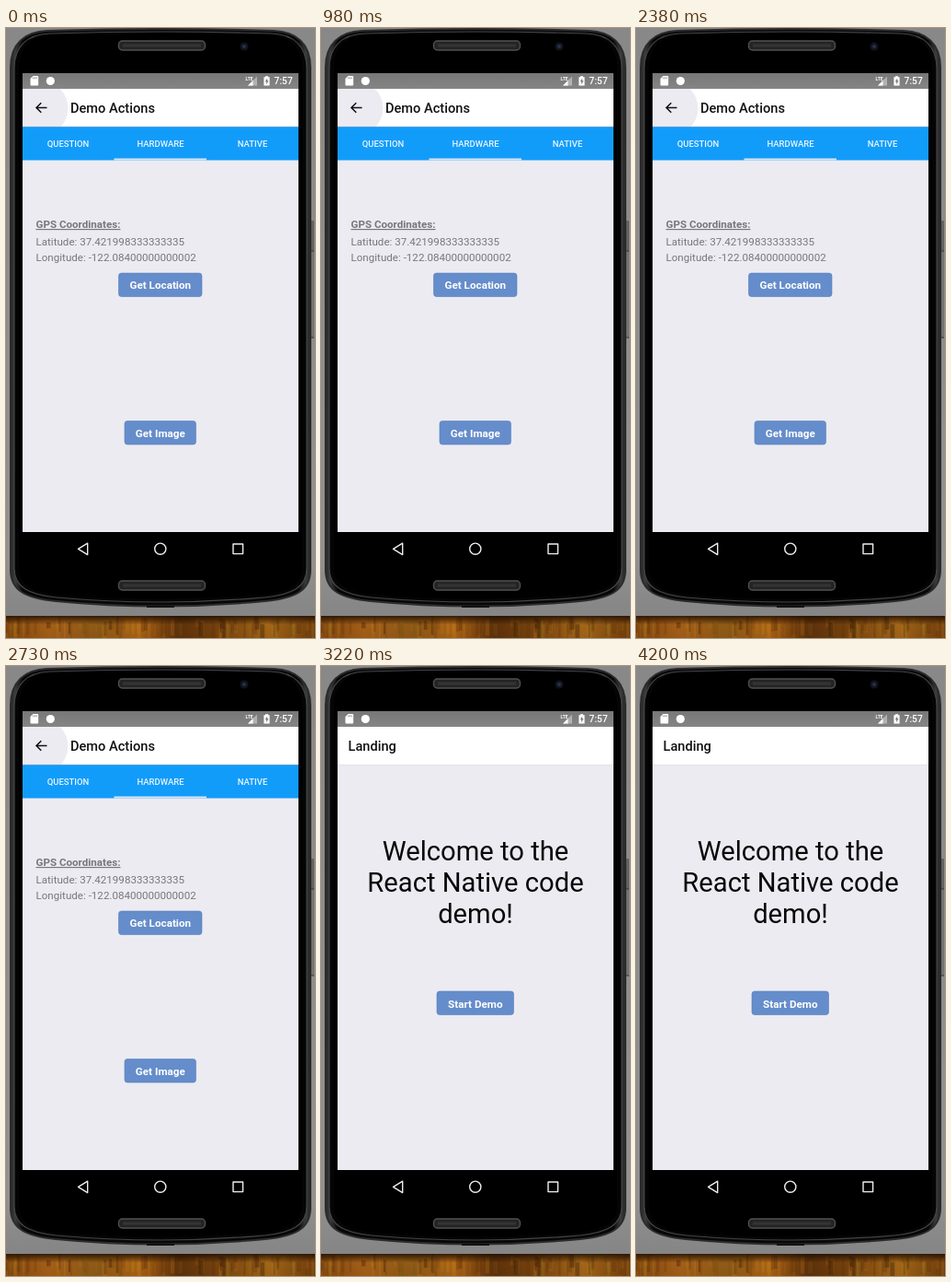
These frames come from a looping animation (336 by 662 pixels, 4.27 s). An HTML page:

```html
<!DOCTYPE html>
<html lang="en">
<head>
<meta charset="utf-8">
<title>Phone demo</title>
<style>
  html, body { margin: 0; width: 100%; height: 100%; overflow: hidden; background: #8a8a8a; }
  svg { display: block; width: 336px; height: 662px; font-family: Roboto, sans-serif; }
  .title { font-size: 14.6px; font-weight: 500; fill: #111; }
  .tab { font-size: 9.5px; font-weight: 500; fill: #e9f5ff; text-anchor: middle; }
  .label { font-size: 11.6px; fill: #77777b; }
  .button rect { fill: #658dcb; stroke: #577dba; stroke-width: .6; }
  .button text { font-size: 11.7px; font-weight: 700; fill: #fff; text-anchor: middle; }
  .hero { font-size: 29.2px; fill: #080808; text-anchor: middle; }
</style>
</head>
<body>
<svg viewBox="0 0 336 662">
  <defs>
    <linearGradient id="desk" x2="0" y2="1">
      <stop offset="0" stop-color="#888"/>
      <stop offset=".9" stop-color="#919191"/>
      <stop offset="1" stop-color="#858585"/>
    </linearGradient>
    <linearGradient id="wood">
      <stop offset="0" stop-color="#8e4d10"/>
      <stop offset=".14" stop-color="#b3681a"/>
      <stop offset=".3" stop-color="#9a6218"/>
      <stop offset=".43" stop-color="#ba6c16"/>
      <stop offset=".56" stop-color="#64350b"/>
      <stop offset=".7" stop-color="#854b10"/>
      <stop offset=".85" stop-color="#b1701a"/>
      <stop offset="1" stop-color="#7c420d"/>
    </linearGradient>
    <linearGradient id="shade" x2="0" y2="1">
      <stop offset="0" stop-color="#1d0d02" stop-opacity=".85"/>
      <stop offset=".4" stop-color="#1d0d02" stop-opacity=".1"/>
      <stop offset="1" stop-color="#1d0d02" stop-opacity=".15"/>
    </linearGradient>
    <linearGradient id="case">
      <stop offset="0" stop-color="#252525"/>
      <stop offset=".015" stop-color="#3d3d3d"/>
      <stop offset=".04" stop-color="#080808"/>
      <stop offset=".96" stop-color="#080808"/>
      <stop offset=".985" stop-color="#3d3d3d"/>
      <stop offset="1" stop-color="#222"/>
    </linearGradient>
    <linearGradient id="status" x2="0" y2="1">
      <stop offset="0" stop-color="#777"/>
      <stop offset="1" stop-color="#858585"/>
    </linearGradient>
    <clipPath id="header"><rect x="18" y="66" width="300" height="41"/></clipPath>
  </defs>

  <rect width="336" height="638" fill="url(#desk)"/>
  <rect y="638" width="336" height="24" fill="url(#wood)"/>
  <g id="grain"></g>
  <rect y="638" width="336" height="24" fill="url(#shade)"/>

  <!-- phone -->
  <rect x="331" y="209" width="4" height="33" rx="1" fill="#626262"/>
  <rect x="331" y="242" width="4" height="94" rx="1" fill="#737373"/>
  <path d="M331 242h4M331 336h4" stroke="#333"/>
  <path d="M45 3Q168 -1 291 3C316 4 331 17 331 43V588C331 611 314 619 282 622Q168 633 54 622C22 619 5 611 5 588V43C5 17 20 4 45 3Z" fill="url(#case)" stroke="#2c2c2c" stroke-width="2"/>
  <path d="M47 6Q168 2 289 6C313 7 327 20 327 44V586C327 607 311 615 281 618Q168 628 55 618C25 615 9 607 9 586V44C9 20 23 7 47 6Z" fill="#050505" stroke="#444" stroke-width="1.2"/>
  <path d="M48 8Q168 4 288 8C310 9 322 22 322 45V585C322 604 308 612 280 615Q168 624 56 615C28 612 14 604 14 585V45C14 22 26 9 48 8Z" fill="#000"/>
  <path d="M153 628h30" stroke="#111" stroke-width="2"/>
  <g fill="#242424" stroke="#505050" stroke-width="1.4">
    <rect x="122.5" y="14" width="94" height="10" rx="4"/>
    <rect x="122.5" y="600" width="94" height="10" rx="4"/>
  </g>
  <path d="M127 19h85M127 605h85" stroke="#343434" stroke-width="3"/>
  <circle cx="259" cy="20" r="4.5" fill="#11141d"/>
  <circle cx="259" cy="20" r="2" fill="#26314c"/>

  <rect x="18" y="49" width="300" height="498" fill="#fff"/>

  <g id="hardware">
    <rect x="18" y="107" width="300" height="440" fill="#ecebf2"/>
    <circle cx="38" cy="87" r="29.5" fill="#ecebf2" clip-path="url(#header)"/>
    <path d="M44.5 86.5H33M38.3 81.2L33 86.5L38.3 91.8" fill="none" stroke="#111" stroke-width="1.5"/>
    <text class="title" x="70" y="92">Demo Actions</text>
    <rect x="18" y="107" width="300" height="36.5" fill="#129cfa"/>
    <path d="M18 107.3h300" stroke="#8aa9c4" stroke-width=".6"/>
    <rect x="117.5" y="141.5" width="100.5" height="2" fill="#d9e5f2"/>
    <text class="tab" x="67.5" y="129">QUESTION</text>
    <text class="tab" x="168" y="129">HARDWARE</text>
    <text class="tab" x="268" y="129">NATIVE</text>
    <text class="label" x="32.5" y="217" font-weight="700" text-decoration="underline">GPS Coordinates:</text>
    <text class="label" x="32.5" y="236">Latitude: 37.421998333333335</text>
    <text class="label" x="32.5" y="253">Longitude: -122.08400000000002</text>
    <g class="button">
      <rect x="122.5" y="266" width="90.5" height="25.5" rx="3"/>
      <text x="167.8" y="283.3">Get Location</text>
      <rect x="129" y="426.5" width="77.5" height="25.5" rx="3"/>
      <text x="167.8" y="443.8">Get Image</text>
    </g>
  </g>

  <g id="landing">
    <rect x="18" y="107" width="300" height="440" fill="#ecebf2"/>
    <path d="M18 107.3h300" stroke="#dddce2" stroke-width=".6"/>
    <text class="title" x="29.5" y="92">Landing</text>
    <g class="hero">
      <text x="168" y="211">Welcome to the</text>
      <text x="168" y="245">React Native code</text>
      <text x="168" y="279">demo!</text>
    </g>
    <g class="button">
      <rect x="126" y="353" width="83.5" height="25.5" rx="3"/>
      <text x="167.8" y="370.5">Start Demo</text>
    </g>
  </g>

  <!-- status bar -->
  <rect x="18" y="49" width="300" height="17" fill="url(#status)"/>
  <g fill="#fff">
    <path d="M29.5 52H34.2Q35.2 52 35.2 53V61.5Q35.2 62.5 34.2 62.5H27.5Q26.5 62.5 26.5 61.5V55Z"/>
    <path d="M29.7 53.3v2M31.5 53.3v2M33.3 53.3v2" stroke="#7d7d7d" stroke-width=".8"/>
    <circle cx="48.3" cy="57.5" r="4.6"/>
    <text x="260.5" y="56.5" font-size="5" font-weight="700">LTE</text>
    <path d="M273 52.5V62.5H263Z" opacity=".4"/>
    <path d="M268.5 57V62.5H263Z"/>
    <path d="M282 52.2h3v1h1.6v9.3h-6.2v-9.3H282Z"/>
    <path d="M284.2 54.5L281.7 58.3H283.2V61.2L285.5 57.3H284.2Z" fill="#777"/>
    <text x="291.6" y="61.4" font-size="10.2" font-weight="500">7:57</text>
  </g>

  <!-- navigation -->
  <g fill="none" stroke="#eee" stroke-width="1.4" stroke-linejoin="round">
    <path d="M78.5 565.3L88.7 559.2V571.6Z"/>
    <circle cx="167.8" cy="565.2" r="6.1"/>
    <rect x="247" y="560" width="10.6" height="10.6"/>
  </g>
</svg>
<script>
  const LOOP = 4270;
  const steps = [[0, "hardware"], [2800, "blank"], [3150, "landing"]];
  const screens = ["hardware", "landing"].map(id => document.getElementById(id));

  function drawGrain() {
    let seed = 7;
    const random = () => (seed = seed * 16807 % 2147483647) / 2147483647;
    const tones = ["#2e1504", "#d58a24", "#693408", "#a88022"];
    let streaks = "";
    for (let i = 0; i < 110; i++) {
      const x = random() * 336, y = 638 + random() * 10;
      const w = 1 + random() * 4, h = 6 + random() * 16;
      streaks += `<rect x="${x}" y="${y}" width="${w}" height="${Math.min(h, 662 - y)}"
        fill="${tones[i % 4]}" opacity="${0.1 + random() * 0.25}"/>`;
    }
    document.getElementById("grain").innerHTML = streaks;
  }

  function render() {
    const t = performance.now() % LOOP;
    const current = steps.filter(([start]) => start <= t).pop()[1];
    for (const screen of screens) {
      screen.style.display = screen.id === current ? "" : "none";
    }
    requestAnimationFrame(render);
  }

  drawGrain();
  render();
</script>
</body>
</html>
```
